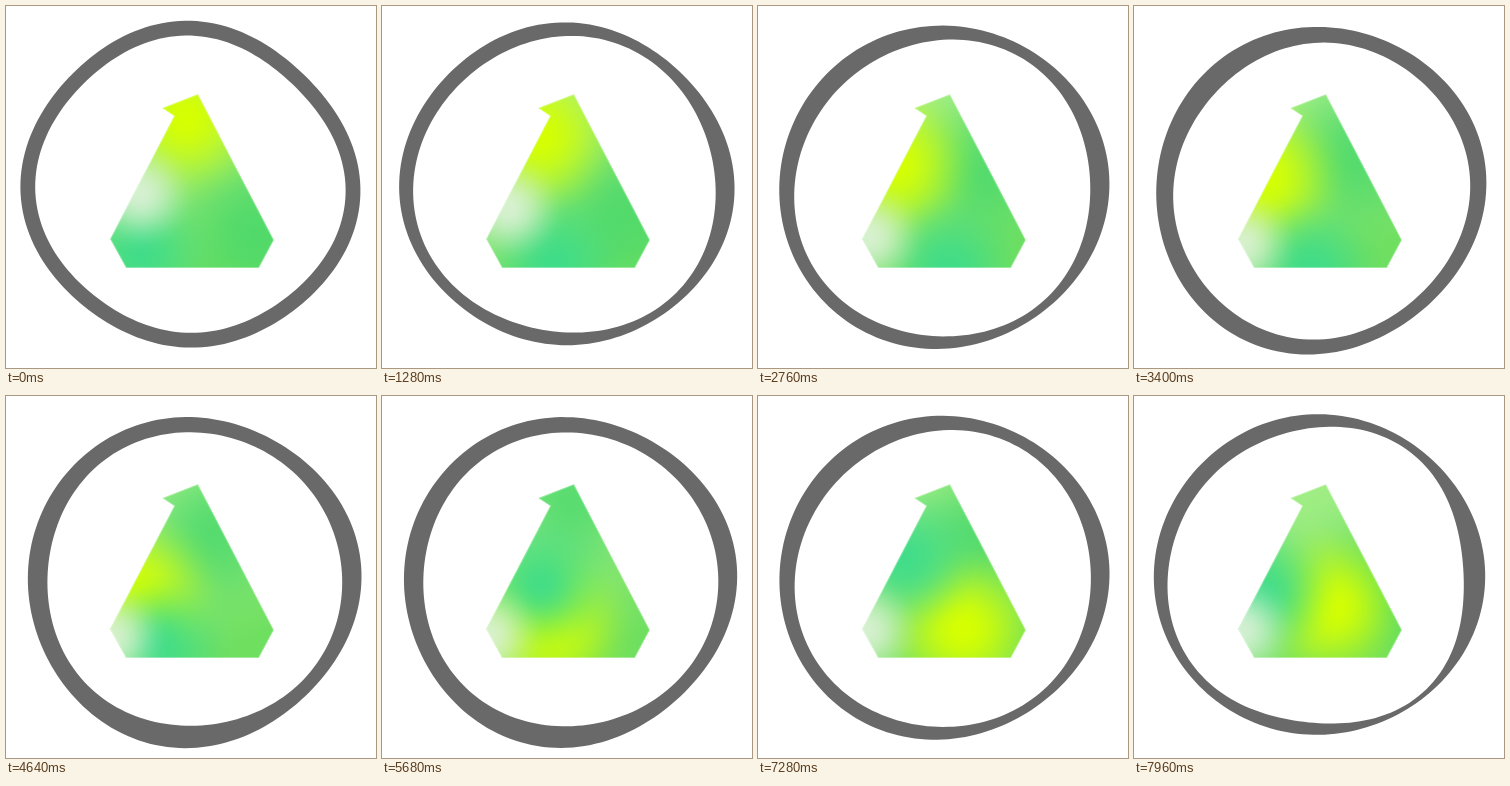
An HTML page with a canvas that plays this animation: 370 by 362 pixels, repeating every 8 s.

```html
<!DOCTYPE html>
<html lang="en">
<head>
<meta charset="utf-8">
<title>Gradient shape in a wobbling ring</title>
<style>
  html, body { margin: 0; width: 100%; height: 100%; overflow: hidden; background: #fff; }
  canvas { display: block; width: 370px; height: 362px; }
</style>
</head>
<body>
<canvas id="stage"></canvas>
<script>
const LOOP = 8000;
const TURN = 5060; // the ring runs its motion backwards after this moment

const canvas = document.getElementById('stage');
const scale = window.devicePixelRatio || 1;
canvas.width = 370 * scale;
canvas.height = 362 * scale;
const ctx = canvas.getContext('2d');

// Each outline is a circle bent by a few waves.
// Key: time, radius, shift x and y, oval (cos, sin), triangle (cos, sin), square.
const outer = [
  [0, 164, -1, -2.6, 3.3, 1.3, .4, 1.2, 2.7],
  [2160, 162.5, 0, -3, 2.7, -.3, .5, .5, .5],
  [3400, 164, 0, 1.7, .7, -2.6, 2.3, -.8, .3],
  [4800, 165.2, 1.5, 3.3, .7, -.6, 2.2, -1.3, 1]
];
const inner = [
  [0, 149.2, -1, -2.6, 3.3, 1.3, .4, 1.2, 2.7],
  [2160, 150, 0, -.6, 0, -.9, -3.3, 2.2, -2],
  [3400, 147.4, 2, 3.1, 0, -2.7, .8, 0, 1],
  [4800, 147.7, 2.6, 1.7, .3, .3, 1.2, .8, -.7]
];

// Drifting colour spots. Key: time, x, y.
const spots = [
  { color: '72,216,108', radius: 100, alpha: .8, path: [
    [0, 250, 225], [3400, 218, 150], [4640, 208, 135], [6640, 185, 90], [7960, 255, 190]] },
  { color: '214,255,0', radius: 92, alpha: 1, path: [
    [0, 180, 112], [1700, 150, 138], [4640, 130, 198], [6640, 206, 252], [7960, 198, 211]] },
  { color: '62,220,138', radius: 82, alpha: .95, path: [
    [0, 135, 247], [2160, 195, 262], [4640, 152, 250], [6640, 165, 138], [7960, 130, 195]] },
  { color: '228,242,224', radius: 60, alpha: .85, path: [
    [0, 134, 188], [3400, 108, 238], [7960, 108, 234]] }
];

const shape = new Path2D('M192 88 L268 234 L253 262 L120 262 L104 233 L168 110 L156 102 Z');

// Smooth curve through keys of the form [time, ...values].
function blend(keys, t) {
  const last = keys.length - 1;
  const time = Math.min(t, keys[last][0]);
  const i = Math.max(0, keys.findIndex(key => key[0] >= time) - 1);
  const from = keys[i], to = keys[i + 1];
  const span = to[0] - from[0];
  const u = (time - from[0]) / span, v = 1 - u;
  const tangent = (k, c) => k === 0 || k === last ? 0
    : (keys[k + 1][c] - keys[k - 1][c]) / (keys[k + 1][0] - keys[k - 1][0]);
  return from.map((a, c) => a * (1 + 2 * u) * v * v + to[c] * u * u * (3 - 2 * u)
    + span * u * v * (tangent(i, c) * v - tangent(i + 1, c) * u)).slice(1);
}

function addOutline([radius, x, y, ovalC, ovalS, triC, triS, square]) {
  for (let degree = 0; degree < 360; degree += 2) {
    const a = degree * Math.PI / 180;
    const cos = Math.cos(a), sin = Math.sin(a);
    const r = radius + x * cos + y * sin
      + ovalC * Math.cos(2 * a) + ovalS * Math.sin(2 * a)
      + triC * Math.cos(3 * a) + triS * Math.sin(3 * a)
      + square * Math.cos(4 * a);
    ctx[degree ? 'lineTo' : 'moveTo'](185 + r * cos, 182 + r * sin);
  }
  ctx.closePath();
}

function drawRing(t) {
  const time = t > TURN ? 2 * TURN - t : t;
  ctx.beginPath();
  addOutline(blend(outer, time));
  addOutline(blend(inner, time));
  ctx.fillStyle = '#696969';
  ctx.fill('evenodd');
}

function fillShape(paint) {
  ctx.fillStyle = paint;
  ctx.fill(shape);
}

function drawShape(t) {
  ctx.save();
  ctx.clip(shape);
  const base = ctx.createLinearGradient(165, 95, 230, 250);
  base.addColorStop(0, '#a2ee86');
  base.addColorStop(1, '#6fdf60');
  fillShape(base);
  for (const { color, radius, alpha, path } of spots) {
    const [x, y] = blend(path, t);
    const glow = ctx.createRadialGradient(x, y, 0, x, y, radius);
    // Bell-shaped falloff
    for (let u = 0; u <= 1; u += .125) {
      const fade = (1 + Math.cos(Math.PI * u)) / 2;
      glow.addColorStop(u, `rgba(${color},${alpha * fade})`);
    }
    fillShape(glow);
  }
  ctx.strokeStyle = 'rgba(255,255,255,.35)';
  ctx.lineWidth = 2;
  ctx.stroke(shape);
  ctx.restore();
}

function draw(now) {
  const t = now % LOOP;
  ctx.setTransform(scale, 0, 0, scale, 0, 0);
  ctx.fillStyle = '#fff';
  ctx.fillRect(0, 0, 370, 362);
  drawRing(t);
  drawShape(t);
}

let start;
function tick(now) {
  start ??= now;
  draw(now - start);
  requestAnimationFrame(tick);
}
draw(0);
requestAnimationFrame(tick);
</script>
</body>
</html>
```
